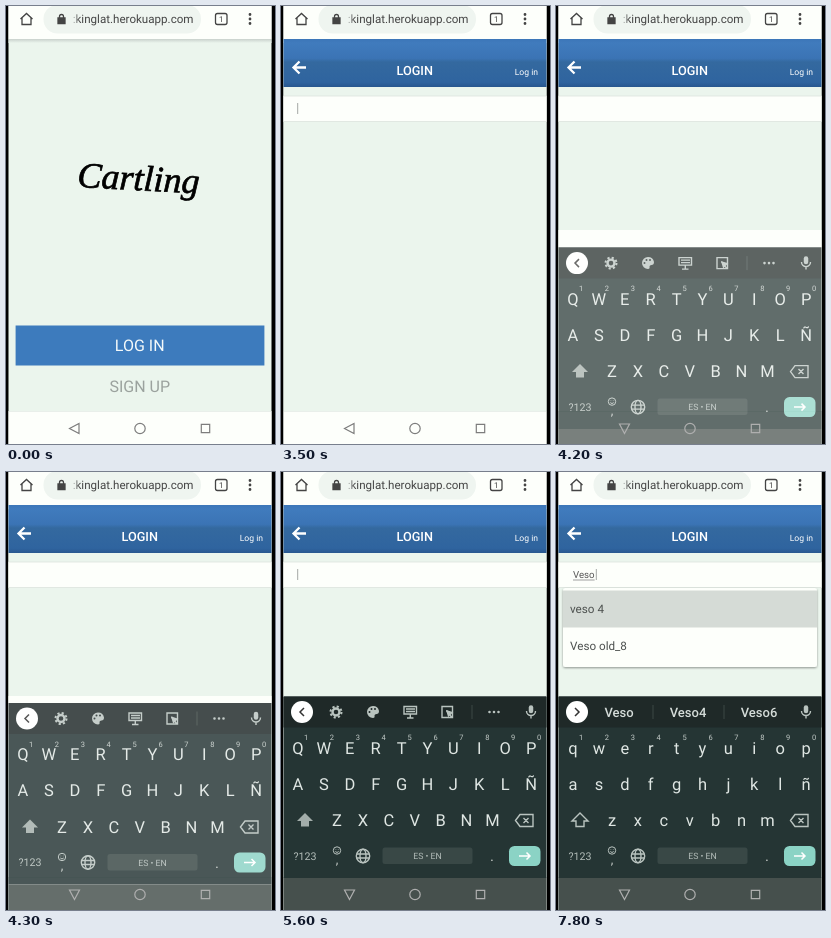
Write an HTML page that moves like this. It is 269 by 438 pixels and loops after 8000 ms.

```html
<!DOCTYPE html>
<html lang="en">
<head>
<meta charset="utf-8">
<title>Login on a phone</title>
<style>
  html, body { margin: 0; height: 100%; overflow: hidden; background: #000; }
  svg { display: block; width: 100vw; height: 100vh; font-family: Roboto, sans-serif; text-rendering: geometricPrecision; }
  .line { fill: none; stroke: #b9c3bf; stroke-width: 1.4; }
  .logo { font: italic 36px "Liberation Serif", serif; stroke: #000; stroke-width: .7; }
</style>
</head>
<body>
<svg viewBox="0 0 269 438">
  <defs>
    <linearGradient id="blue" x2="0" y2="1">
      <stop stop-color="#3c76b8"/><stop offset=".08" stop-color="#407bbd"/><stop offset=".4" stop-color="#3b74b5"/>
      <stop offset=".48" stop-color="#34699f"/><stop offset=".9" stop-color="#2f649f"/><stop offset="1" stop-color="#28578f"/>
    </linearGradient>
    <linearGradient id="shade" x2="0" y2="1">
      <stop stop-color="#c9d1cc"/><stop offset="1" stop-color="#ebf5ed"/>
    </linearGradient>
    <linearGradient id="urlFade">
      <stop stop-color="#eff5f0"/><stop offset="1" stop-color="#eff5f0" stop-opacity="0"/>
    </linearGradient>
    <filter id="soft"><feDropShadow dx="0" dy="1" stdDeviation="1.2" flood-opacity=".4"/></filter>
    <clipPath id="screen"><path d="M2.5 0H265.5V438H2.5Z"/></clipPath>
  </defs>
  <g clip-path="url(#screen)">
    <path fill="#ebf5ed" d="M0 0H269V438H0Z"/>
    <g id="home">
      <path fill="url(#shade)" d="M0 33H269V37H0Z"/>
      <text class="logo" x="71" y="181" transform="rotate(3 71 181)">Cartling</text>
      <path fill="#3d7bbd" d="M9.600 319.600H258.400V359.500H9.600Z"/>
    </g>
    <g id="login">
      <path fill="#ebf5ed" d="M0 33H269V405H0Z"/>
      <path fill="url(#blue)" d="M0 33H269V81H0Z"/>
      <path fill="none" stroke="#fff" stroke-width="2.3" d="M25 61.500H13M18.500 55.500L12.500 61.500L18.500 67.500"/>
      <path fill="#fdfffb" stroke="#dce4de" stroke-width=".8" d="M0 90H269V115.500H0Z"/>
      <path id="underline" stroke="#777" stroke-width=".7"/>
      <path id="cursor" stroke="#9a9f9c" stroke-width=".9"/>
    </g>
    <g id="menu">
      <rect id="card" x="7" y="116" width="254" rx="2.500" fill="#fdfffb" filter="url(#soft)"/>
      <path id="hover" fill="#d5dbd6" d="M7 118.500H261V155.500H7Z"/>
    </g>
    <path fill="#fdfffb" d="M0 0H269V33H0Z"/>
    <rect x="37.500" y="-1" width="157.500" height="28.500" rx="14" fill="#eff5f0"/>
    <g id="browser" fill="none" stroke="#444" stroke-width="1.300">
      <path d="M14.500 13L20.500 7.500L26.500 13M16 12V18.500H25V12"/>
      <path fill="#444" d="M52 12H59V17.500H52Z"/><path d="M53.500 12V10.500a2 2 0 0 1 4 0V12"/>
      <rect x="209.500" y="7.500" width="11.500" height="11" rx="2"/>
      <path stroke-width="2.800" stroke-linecap="round" d="M244 8.500h0M244 13h0M244 17.500h0"/>
    </g>
    <path id="gap" fill="#fdfffb" d="M0 224H269V405H0Z"/>
    <path fill="#fdfffb" stroke="#e6ece7" stroke-width=".8" d="M0 405.500H269V440H0Z"/>
    <g id="keyboard">
      <path fill="#253534" d="M0 224.500H269V406H0Z"/>
      <path fill="#1f2928" d="M0 224.500H269V255.500H0Z"/>
      <path fill="#46504d" d="M0 406H269V440H0Z"/>
      <circle cx="21" cy="240" r="11" fill="#fff"/>
      <path id="chevron" fill="none" stroke="#333" stroke-width="1.500" d="M2 -4L-2 0L2 4"/>
      <g id="tools" class="line">
        <circle cx="55" cy="240" r="3.500" stroke-width="2.400"/>
        <circle cx="55" cy="240" r="5.500" stroke-width="2" stroke-dasharray="2.160 2.160"/>
        <path fill="#b9c3bf" stroke="none" d="M92 234a6 6 0 1 0 0 12q2 0 1.500-2.500q0-1.500 2-1.500q2.500 0 2.500-3q-1-5-6-5"/>
        <path stroke="#1f2928" stroke-width="2" stroke-linecap="round" d="M88.500 240h0M90.500 237h0M94 237h0"/>
        <path d="M123 234.500H135.500V242H123ZM125 237H134M125 239.500H134M129.300 242V246M126 246H132.500"/>
        <path d="M161 234.500H171.500V245.500H161ZM165.500 238.500L170.500 245"/>
        <path fill="#b9c3bf" d="M166 239L171 240.500L167.500 244Z"/>
        <path stroke-width="1" stroke="#3d4845" d="M191 233V247"/>
        <path stroke-width="2.600" stroke-linecap="round" d="M208.500 240h0M213 240h0M217.500 240h0"/>
      </g>
      <g id="words"><path stroke="#3d4845" d="M97 233V247M168 233V247"/></g>
      <g class="line">
        <path style="stroke-width:4.500;stroke-linecap:round" d="M250 235.500V239"/>
        <path d="M245.500 239a4.500 4.500 0 0 0 9 0M250 243.500V246.500"/>
        <path id="shift" d="M24 341L32 349H28V354.500H20V349H16Z"/>
        <path d="M234.500 348.500L239 342.500H252V354.500H239ZM242.500 346L247.500 351M247.500 346L242.500 351"/>
        <circle cx="56" cy="378.500" r="3.700" stroke-width="1"/>
        <path stroke-width="1" d="M54.300 379.500q1.700 2 3.400 0M54.700 377.500h.5M56.900 377.500h.5"/>
        <circle cx="82" cy="384" r="6.700"/>
        <ellipse cx="82" cy="384" rx="3" ry="6.700"/>
        <path d="M76 382H88M76 386H88"/>
      </g>
      <rect x="101.500" y="375.500" width="90" height="16.500" rx="2.500" fill="#394846"/>
      <rect x="228" y="374" width="31.500" height="20" rx="5.500" fill="#8bd3c5"/>
      <path fill="none" stroke="#fff" stroke-width="1.500" d="M238 384H249M245.500 380.500L249 384L245.500 387.500"/>
    </g>
    <g id="nav" fill="none" stroke-width="1.200">
      <path id="back" d="M-5 0L4.500 -5V5Z"/>
      <circle cx="134" cy="422.500" r="5.200"/>
      <path d="M195.300 418.300H203.700V426.700H195.300Z"/>
    </g>
  </g>
</svg>
<script>
const $ = id => document.getElementById(id);
const set = (id, attrs) => { for (const k in attrs) $(id).setAttribute(k, attrs[k]); };
const show = (id, on) => set(id, { visibility: on ? 'visible' : 'hidden' });
const clamp = v => Math.max(0, Math.min(1, v));

// Adds text whose capitals are centred on y.
function label(parent, text, x, y, size, fill, anchor = 'middle', weight = 400) {
  const el = document.createElementNS('http://www.w3.org/2000/svg', 'text');
  const attrs = { x, y: y + size * .36, 'font-size': size, fill, stroke: 'none', 'text-anchor': anchor, 'font-weight': weight };
  for (const k in attrs) el.setAttribute(k, attrs[k]);
  el.textContent = text;
  $(parent).append(el);
  return el;
}

label('home', 'LOG IN', 133.7, 339.7, 16, '#f4f9fa');
label('home', 'SIGN UP', 133.7, 380.3, 16, '#9ba29e');
label('login', 'LOGIN', 133.7, 64.2, 12.7, '#fff', 'middle', 500);
label('login', 'Log in', 257, 66.2, 8.6, '#fff', 'end');
const placeholder = label('login', 'Name', 14, 102, 10.5, '#dfe3e1', 'start');
const typed = label('login', '', 17, 102.5, 9.7, '#555', 'start');
label('menu', 'veso 4', 14, 137, 11.7, '#4c504e', 'start');
label('menu', 'Veso old_8', 14, 174, 11.7, '#4c504e', 'start');
const third = label('menu', 'Veso tmp_5', 14, 211, 11.7, '#4c504e', 'start');
label('browser', ':kinglat.herokuapp.com', 187.5, 13, 11.6, '#444', 'end');
$('browser').insertAdjacentHTML('beforeend', '<path fill="url(#urlFade)" stroke="none" d="M64 5H74V22H64Z"/>');
label('browser', '1', 215.3, 13, 8, '#444');

const keys = [];
[['QWERTYUIOP', 17], ['ASDFGHJKLÑ', 17], ['ZXCVBNM', 56]].forEach(([row, left], r) =>
  [...row].forEach((ch, i) => {
    const x = left + i * 25.9;
    keys.push([label('keyboard', ch, x, 275.7 + r * 36.3, 16.5, '#dfe6e3'), ch]);
    if (!r) label('keyboard', (i + 1) % 10, x + 8, 265.5, 7.5, '#c3cbc8');
  }));
label('keyboard', '?123', 24, 384, 10.7, '#b3bdb9');
label('keyboard', ',', 56, 387, 13, '#c3c8c6');
label('keyboard', 'ES • EN', 146.5, 384, 8.7, '#b3bdb9');
label('keyboard', '.', 211, 384, 15, '#c3c8c6');
const words = [63, 132, 203].map(x => label('words', '', x, 240, 13, '#d5dcd9', 'middle', 500));

const cursorOn = [[3500, 4100], [4400, 4900], [5600, 6000], [6100, 6600], [6900, 7600], [7800, 8000]];
const typing = [[6100, 'V'], [6900, 'Ve'], [7000, 'Ves'], [7100, 'Veso']];

function draw(t) {
  const entered = clamp((t - 400) / 200);
  set('login', { opacity: entered });

  placeholder.setAttribute('visibility', t < 3500 ? 'visible' : 'hidden');
  const text = typing.reduce((s, [at, str]) => t >= at ? str : s, '');
  typed.textContent = text;
  const end = text ? 17 + typed.getComputedTextLength() : 15;
  set('underline', { d: text ? `M17 108H${end}` : '' });
  set('cursor', { d: `M${end + 1.7} 97V108` });
  show('cursor', cursorOn.some(([a, b]) => t >= a && t < b));

  // Suggestion list under the field
  const filtered = clamp((t - 7500) / 300);
  set('menu', { opacity: clamp((t - 6200) / 400) });
  set('card', { height: 116 - 37 * filtered });
  set('hover', { opacity: filtered });
  third.setAttribute('opacity', 1 - filtered);

  // Keyboard slides up while it fades in more slowly
  const left = t < 4500 ? .38 ** ((t - 4100) / 100) : 0;
  show('gap', t >= 4100);
  set('keyboard', {
    display: t >= 4100 ? 'inline' : 'none',
    opacity: 1 - .45 * Math.sqrt(left),
    transform: `translate(0 ${45 * left})`
  });
  const lower = t >= 6300;
  for (const [el, ch] of keys) el.textContent = lower ? ch.toLowerCase() : ch;
  set('shift', { style: lower ? '' : 'fill:#a3adaa;stroke:none' });
  set('chevron', { transform: `translate(21 240) scale(${lower ? -1 : 1} 1)` });
  show('tools', !lower);
  show('words', lower);
  const hints = t >= 7100 ? ['Veso', 'Veso4', 'Veso6'] : t >= 6900 ? ['Ve', 'Ver', 'Vez'] : ['V', 'Va', 'Ve'];
  words.forEach((el, i) => el.textContent = hints[i]);

  // Back arrow turns down when the keyboard opens
  const turn = clamp((t - 3600) / 300), grey = 125 + 50 * turn;
  set('back', { transform: `translate(68.500 422.500) rotate(${-90 * turn})` });
  set('nav', { stroke: `rgb(${grey},${grey},${grey})` });
}

function frame() {
  draw(Math.floor(performance.now() % 8000 / 100) * 100);
  requestAnimationFrame(frame);
}
frame();
</script>
</body>
</html>
```
